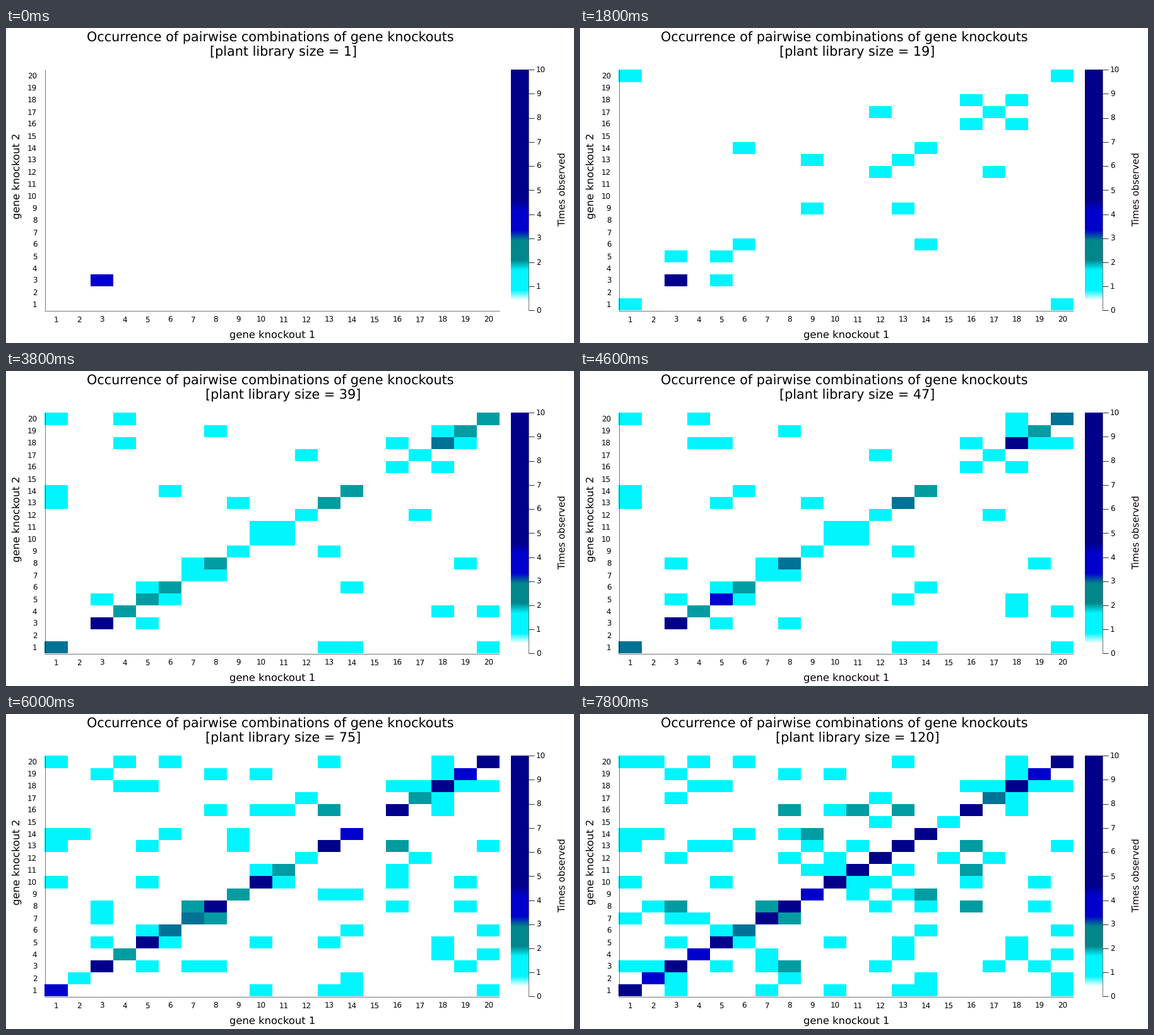
A matplotlib script that plays this animation: 900x500 px, repeating every 8 s.

```python
from itertools import pairwise

import matplotlib.pyplot as plt
import numpy as np
from matplotlib.animation import FuncAnimation
from matplotlib.colors import LinearSegmentedColormap

W, H, DPI = 900, 500, 100
LEFT, RIGHT, TOP, BOTTOM = 61, 782, 66, 448
GENES = 20

plt.rcParams.update({"font.family": "DejaVu Sans", "text.hinting": "none"})

# Library size at each step: by two up to 49, then by five from 50.
SIZES = [*range(1, 50, 2), *range(50, 121, 5)]

# Neighbours in a chain are double knockouts, in order of discovery.
CHAINS = [
    [3, 3], [16, 18], [6, 14], [9, 13], [12, 17], [1, 20], [3, 5],
    [1, 14], [10, 11], [5, 6], [19, 18, 4, 20],
    [19, 8, 7], [1, 13, 5, 18, 20], [3, 8],
    [1, 10, 19, 3, 7, 8, 16, 13, 16, 10, 5],
    [6, 20, 13], [11, 16], [2, 14, 9], [17, 18],
    [17, 3, 2, 8, 16, 11, 13, 4, 7, 1], [12, 8, 14, 9],
    [10, 12, 12, 3, 1], [12, 15], [9, 11], [2, 20], [3, 8],
]
PAIRS = [pair for chain in CHAINS for pair in pairwise(chain)]


def found(size):
    """Number of double knockouts in a library of this size."""
    return int(np.interp(size, [1, 19, 47, 75, 100, 120],
                         [1, 7, 20, 36, 48, 56]))


def count_pairs(size):
    counts = np.zeros((GENES, GENES))
    for pair in PAIRS[:found(size)]:
        for a in pair:
            for b in pair:
                counts[a - 1, b - 1] += 1
    return counts


def plateau_map(colors):
    """Colour map of flat bands joined by short blends."""
    n = 3 * len(colors) - 3 + 12
    stops = [(0, colors[0])]
    for i, (a, b) in enumerate(pairwise(colors)):
        stops += [((3 * i + 1) / n, a), ((3 * i + 2) / n, b)]
    return LinearSegmentedColormap.from_list("bands", stops + [(1, colors[-1])])


BANDS = plateau_map(["white", "#00f5ff", "#00868b", "#0000cd", "#00008b"])

fig = plt.figure(figsize=(W / DPI, H / DPI), dpi=DPI, facecolor="white")
ax = fig.add_axes([0, 0, 1, 1])
ax.axis("off")


def text(x, y, s, px, ha="center", rotation=0):
    return ax.text(x, y, s, fontsize=px * 72 / DPI, ha=ha, va="baseline",
                   rotation=rotation, rotation_mode="anchor", color="black")


def line(xs, ys, alpha=0.55):
    ax.plot(xs, ys, color="black", alpha=alpha, lw=72 / DPI,
            solid_capstyle="butt")


def mesh(x0, x1, values):
    """Colour grid with its cell edges on whole pixels."""
    rows, cols = values.shape
    xs = np.ceil(np.linspace(x0, x1, cols + 1).round(6))
    ys = np.ceil(np.linspace(BOTTOM, TOP, rows + 1).round(6))
    return ax.pcolormesh(xs, ys, values, cmap=BANDS, vmin=0, vmax=10)


heat = mesh(LEFT, RIGHT, count_pairs(SIZES[0]))
mesh(800, 828, np.linspace(0, 10, 256)[:, None])

line([61.5, 61.5], [TOP, BOTTOM])
line([LEFT, RIGHT], [448.5, 448.5])
line([827.5, 827.5], [TOP, BOTTOM])

TICK = 11.9
cell_w, cell_h = (RIGHT - LEFT) / GENES, (BOTTOM - TOP) / GENES
for g in range(1, GENES + 1):
    text(LEFT + 0.8 + cell_w * (g - 0.5), 467, g, TICK)
    text(49.3, BOTTOM - cell_h * (g - 0.5) + 4.8, g, TICK, ha="right")
for v in range(11):
    y = BOTTOM - (BOTTOM - TOP) * v / 10
    line([828, 837], [y + 0.3, y + 0.3], alpha=0.8)
    text(840, y + 4.4, v, TICK, ha="left")

text(418.4, 22, "Occurrence of pairwise combinations of gene knockouts", 20.8)
subtitle = text(439.6, 44.7, "", 20.8)
text(422.5, 492, "gene knockout 1", 16.35)
text(21.5, 234.5, "gene knockout 2", 16.35, rotation=90)
text(886, 256.5, "Times observed", 14.86, rotation=90)

ax.set_xlim(0, W)
ax.set_ylim(H, 0)


def update(step):
    size = SIZES[step]
    heat.set_array(count_pairs(size))
    subtitle.set_text(f"[plant library size = {size}]")
    return heat, subtitle


anim = FuncAnimation(fig, update, frames=len(SIZES), interval=200,
                     repeat=True, repeat_delay=0)
plt.show()
```
